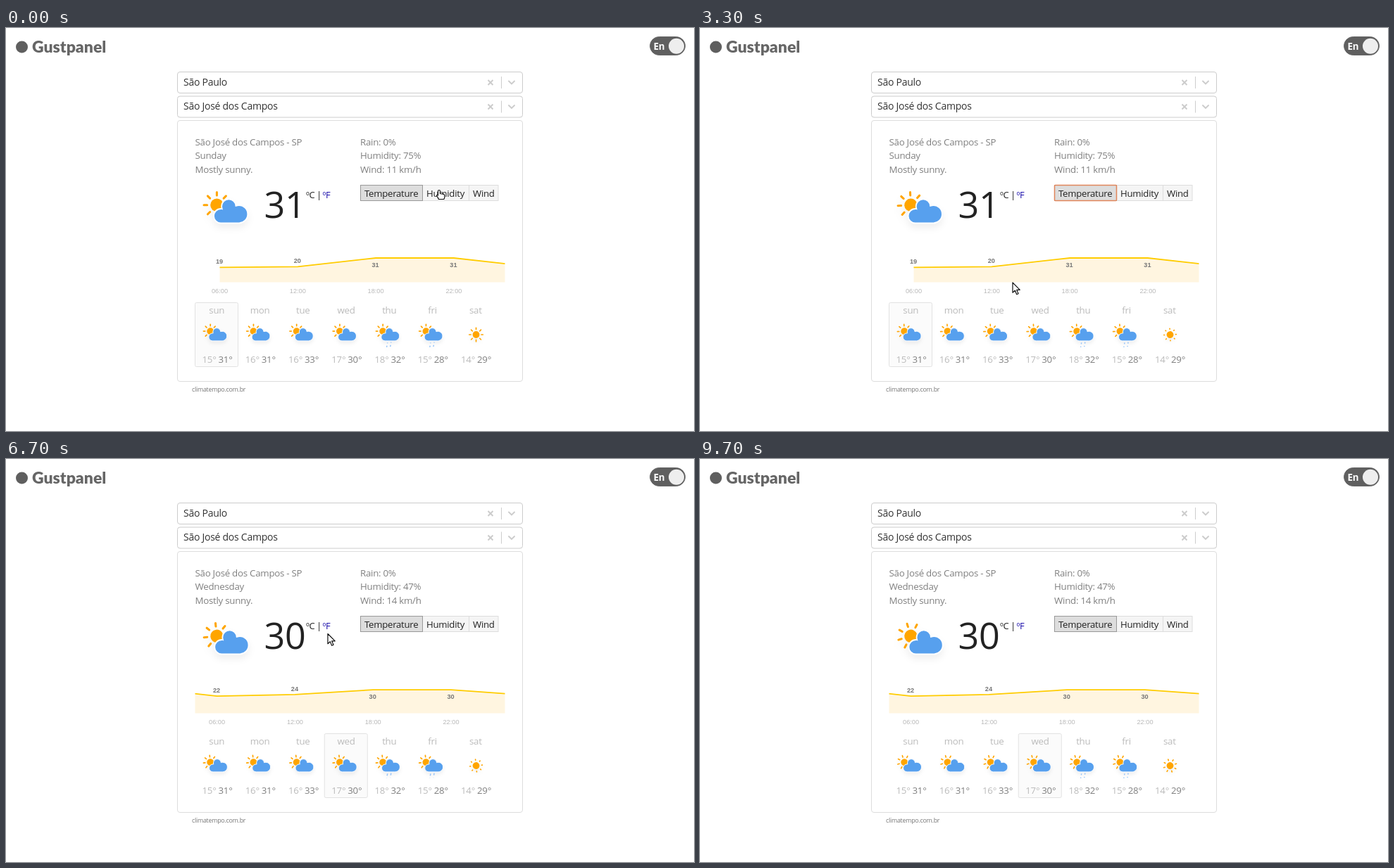
Animation, 977 px wide and 573 px high, one loop 9.8 s. Source, as an HTML page:

```html
<!DOCTYPE html>
<html lang="en">
<head>
<meta charset="utf-8">
<title>Weather widget</title>
<style>
html, body { margin: 0; width: 100%; height: 100%; overflow: hidden; background: #fff; }
svg { display: block; width: 977px; height: 573px; font: 13.3px "Open Sans", "Noto Sans", sans-serif; letter-spacing: -.02em; }
.chart { font: 9.2px "Liberation Sans", Arial, sans-serif; letter-spacing: 0; text-anchor: middle; }
.bold { font-weight: bold; }
.icon { filter: drop-shadow(0 4px 3px rgba(0, 0, 0, .06)); }
</style>
</head>
<body>
<svg id="stage" viewBox="0 0 977 573"></svg>
<script>
const LOOP = 9800;
const HUMIDITY_AT = 400, WIND_AT = 1500, TEMP_AT = 2200, MON_AT = 3992;
const WED_AT = 5404, F_AT = 6900, C_AT = 8000, LEAVE_AT = 9100;

// The picture refreshes in bursts (start, end, step in ms) and rests between them.
const bursts = [[0, 200, 200], [200, 2500, 100], [3300, 4200, 200], [4500, 5200, 200],
  [5500, 6300, 200], [6600, 7500, 200], [7800, 8800, 200], [9100, 9700, 200]];

// Where the pointer comes to rest: arrival time, x, y.
const stops = [[0, 615, 231], [1500, 687, 231], [2200, 550, 235], [3300, 444, 362], [3900, 366, 417],
  [5300, 469, 430], [6700, 456, 234], [7700, 435, 235], [8800, 224, 65]];
const TRAVEL = 600;

const week = [["sun", 15, 31], ["mon", 16, 31], ["tue", 16, 33], ["wed", 17, 30], ["thu", 18, 32], ["fri", 15, 28], ["sat", 14, 29]];
const details = { 0: ["Sunday", 75, 11], 1: ["Monday", 60, 17], 3: ["Wednesday", 47, 14] };
const tabs = [[503.5, 88, "Temperature"], [591.5, 66, "Humidity"], [657.5, 41.5, "Wind"]];
const hours = ["06:00", "12:00", "18:00", "22:00"];
const gusts = [[13, 217], [16, 175], [7, 215], [9, 280]]; // speed, bearing

const CLOUD = "M47.7 35.4c0-4.6-3.7-8.2-8.2-8.2c-1 0-1.9.2-2.8.5c-.3-3.4-3.1-6.2-6.6-6.2c-3.7 0-6.7 3-6.7 6.7" +
  "c0 .8.2 1.6.4 2.3c-.3-.1-.7-.1-1-.1c-3.7 0-6.7 3-6.7 6.7c0 3.6 2.9 6.6 6.5 6.7h17.2C44.2 43.3 47.7 39.8 47.7 35.4z";
const HAND = "M-1.5 1a1.5 1.5 0 0 1 3 0V4.5l4.3.6q2 .4 2 2.4V9.5q0 1.8-1.1 3H-.6Q-1.5 9.8-3.6 7.7q.2-2 2.1-.6z";
const ARROW = "M0 0V14.2l3.3-3.1 2.4 5.6 2.4-1-2.4-5.4h4.6z";

const text = (x, y, s, fill = "#808080", more = "") => `<text x="${x}" y="${y}" fill="${fill}" ${more}>${s}</text>`;
const rect = (x, y, w, h, fill, stroke, r = 0, width = 1) =>
  `<rect x="${x}" y="${y}" width="${w}" height="${h}" rx="${r}" fill="${fill}" stroke="${stroke}" stroke-width="${width}"/>`;
const path = (d, more) => `<path d="${d}" ${more}/>`;
const group = (transform, s, more = "") => `<g transform="${transform}" ${more}>${s}</g>`;
const many = (n, f) => Array.from({ length: n }, (_, i) => f(i)).join("");
const ease = p => (p = Math.min(1, Math.max(0, p)), p * p * (3 - 2 * p));
const swing = (t, period) => Math.abs(t % period / period * 2 - 1); // 1 to 0 and back

function sun(x, y, t, length = 1) {
  const ray = path(`M0 ${10 - length}v${.1 + 2.9 * length}`, 'stroke="orange" stroke-width="2" stroke-linecap="round"');
  return group(`translate(${x} ${y}) rotate(${t * .04})`,
    '<circle r="6" fill="orange"/>' + many(8, i => group(`rotate(${i * 45})`, ray)));
}

function icon(x, y, scale, t, kind = "cloudy") {
  let s;
  if (kind === "sunny") s = sun(32, 32, t, swing(t, 2000));
  else {
    const drift = 2 - 2 * swing(t + 750, 3000);
    s = sun(20, 26, t) + path(CLOUD, `transform="translate(${drift} -1)" fill="#57a0ee" stroke="#fff" stroke-width="1.2"`);
    if (kind === "rainy") {
      const fall = -5 - t / 80;
      s += group("translate(34 46) rotate(10)",
        path("M-6 1v8M0-1v8", `stroke="#91c0f8" stroke-width="1.7" stroke-dasharray="4" stroke-dashoffset="${fall}"`));
    }
  }
  return group(`translate(${x} ${y}) scale(${scale})`, s, 'class="icon"');
}

function select(y, name) {
  return rect(243.5, y, 490, 30, "#fff", "#ccc", 3.5) + text(252, y + 19.3, name, "#333", 'font-size="14"') +
    group(`translate(0 ${y + 15})`,
      path("M684.5-3.5l7 7m0-7l-7 7", 'stroke="#ccc" stroke-width="2"') +
      path("M703.5-8.5v17", 'stroke="#ccc"') +
      path("M714-2l4 4 4-4", 'fill="none" stroke="#ccc" stroke-width="1.9" stroke-linecap="round"'));
}

function button([x, w, name], on, focus) {
  return rect(x, 223.5, w, 22, on ? "#ddd" : "#f5f5f5", on ? "#999" : "#ddd") +
    (focus ? rect(x, 223.5, w, 22, "none", "#e0855a", 1, 1.5) : "") +
    text(x + 5.5, 239.5, name, "#222", 'font-size="13.2"');
}

const pointX = i => 303.5 + i * 110.8;

function temperature(i) {
  const day = i >> 2;
  return [19 + day, 20 + Math.ceil(day * 1.3), week[day][2], week[day][2]][i % 4];
}

function area(count, value, toY, label, line, fill) {
  const top = "M" + Array.from({ length: count }, (_, i) => `${pointX(i)} ${toY(value(i))}`).join("L");
  return path(`${top}V361.5H${pointX(0)}z`, `fill="${fill}"`) +
    path(top, `fill="none" stroke="${line}" stroke-width="1.8"`) +
    many(count, i => text(pointX(i) - .5, toY(value(i)) + (i % 4 < 2 ? -5 : 12.6), label(value(i)), "#777", 'class="bold"'));
}

function gust([speed, bearing], i) {
  return text(pointX(i) - .5, 322, speed + "km/h", "#777", 'class="bold"') +
    group(`translate(${pointX(i)} 340) rotate(${bearing}) scale(${speed / 13})`,
      path("M0 5V-2", 'stroke="#777" stroke-width="1.5"') + path("M-2.4-.6L0-5.5 2.4-.6z", 'fill="#777"'));
}

function chart(mode, scroll, deg) {
  const plot = [
    () => area(20, temperature, v => 327 + (31 - v) * 1.12, deg, "#fc0", "#fff5e0"),
    () => area(5, i => Math.round(75 + 12 * Math.cos(i * 1.5)), v => 361 - v * .4, v => v + "%", "#57a0ee", "#e4effc"),
    () => gusts.map(gust).join("")
  ][mode]();
  const axis = many(20, i => text(pointX(i), 377, hours[i % 4], "#b8b8b8"));
  return `<g clip-path="url(#view)" class="chart">${group(`translate(${-scroll} 0)`, axis + plot)}</g>`;
}

function cursor(t) {
  if (t >= LEAVE_AT) return "";
  let [, x, y] = stops[0];
  for (const [arrival, toX, toY] of stops.slice(1)) {
    const p = ease((t - arrival) / TRAVEL + 1);
    x += (toX - x) * p;
    y += (toY - y) * p;
  }
  const clickable = y > 390 || y > 222 && y < 246;
  return group(`translate(${x} ${y})`,
    path(clickable ? HAND : ARROW, 'fill="#fff" stroke="#111" stroke-width="1.2" stroke-linejoin="round"'));
}

function scene(t) {
  const mode = t < HUMIDITY_AT || t >= TEMP_AT ? 0 : t < WIND_AT ? 1 : 2;
  const focused = t >= HUMIDITY_AT && t < MON_AT;
  const day = t < MON_AT ? 0 : t < WED_AT ? 1 : 3;
  const [dayName, humidity, speed] = details[day];
  const imperial = t >= F_AT && t < C_AT;
  const deg = c => imperial ? Math.round(c * 1.8 + 32) : c;
  const wind = imperial ? Math.round(speed * .6214) + " mph" : speed + " km/h";
  const scroll = 444.5 * (ease((t - MON_AT) / 500) + 2 * ease((t - WED_AT) / 500));
  const link = "#1a0dab", ink = "#222";
  const active = tabs[mode];

  return '<clipPath id="view"><path d="M268.5 300H708.5V385H268.5z"/></clipPath>' +
    '<circle cx="22.5" cy="27" r="8.5" fill="#5f5f5f"/>' +
    text(37, 35, "Gustpanel", "#666", 'font-family="Lato, sans-serif" font-weight="900" font-size="23" letter-spacing="0"') +
    rect(914.5, 12.5, 50, 26, "#5f5f5f", "#666", 13) +
    text(919.5, 30.5, "En", "#fff", 'class="bold"') + '<circle cx="952" cy="25.7" r="11" fill="#eee"/>' +
    select(62.5, "São Paulo") + select(97, "São José dos Campos") +
    rect(243.5, 131.5, 490, 371, "#fff", "#ddd", 3.5) +
    text(268.5, 166.5, "São José dos Campos - SP") + text(268.5, 186, dayName) + text(268.5, 205.5, "Mostly sunny.") +
    text(503, 166.5, "Rain: 0%") + text(503, 186, `Humidity: ${humidity}%`) + text(503, 205.5, "Wind: " + wind) +
    icon(268.8, 212, 1.53, t) +
    text(366.5, 270, deg(week[day][2]), ink, 'font-size="52" font-weight="500"') +
    text(426, 241.5, "ºC", imperial ? link : ink, 'font-size="13"') + text(441, 241.5, "|", ink) +
    text(449.5, 241.5, "ºF", imperial ? ink : link, 'font-size="13"') +
    tabs.filter(tab => tab !== active).map(tab => button(tab)).join("") + button(active, true, focused) +
    chart(mode, scroll, deg) +
    rect(268.5 + day * 61.25, 390.5, 61, 91, "#fbfbfb", "#e2e2e2", 2) +
    week.map(([name, low, high], i) => group(`translate(${i * 61.25} 0)`,
      text(299.3, 406, name, "#bbb", 'text-anchor="middle"') +
      icon(273.8, 409.8, .82, t, i === 6 ? "sunny" : i > 3 ? "rainy" : "cloudy") +
      text(278.5, 476, deg(low) + "°", "#bbb") + text(301.5, 476, deg(high) + "°"))).join("") +
    text(264, 517, "climatempo.com.br", "#777", 'font-size="8.9"') +
    cursor(t);
}

function snap(t) {
  const [start, end, step] = bursts.filter(b => b[0] <= t).pop();
  return t >= end ? end : start + Math.floor((t - start) / step) * step;
}

const stage = document.getElementById("stage");
let shown = -1;
function draw() {
  const t = snap(performance.now() % LOOP);
  if (t !== shown) stage.innerHTML = scene(shown = t);
  requestAnimationFrame(draw);
}
draw();
</script>
</body>
</html>
```
